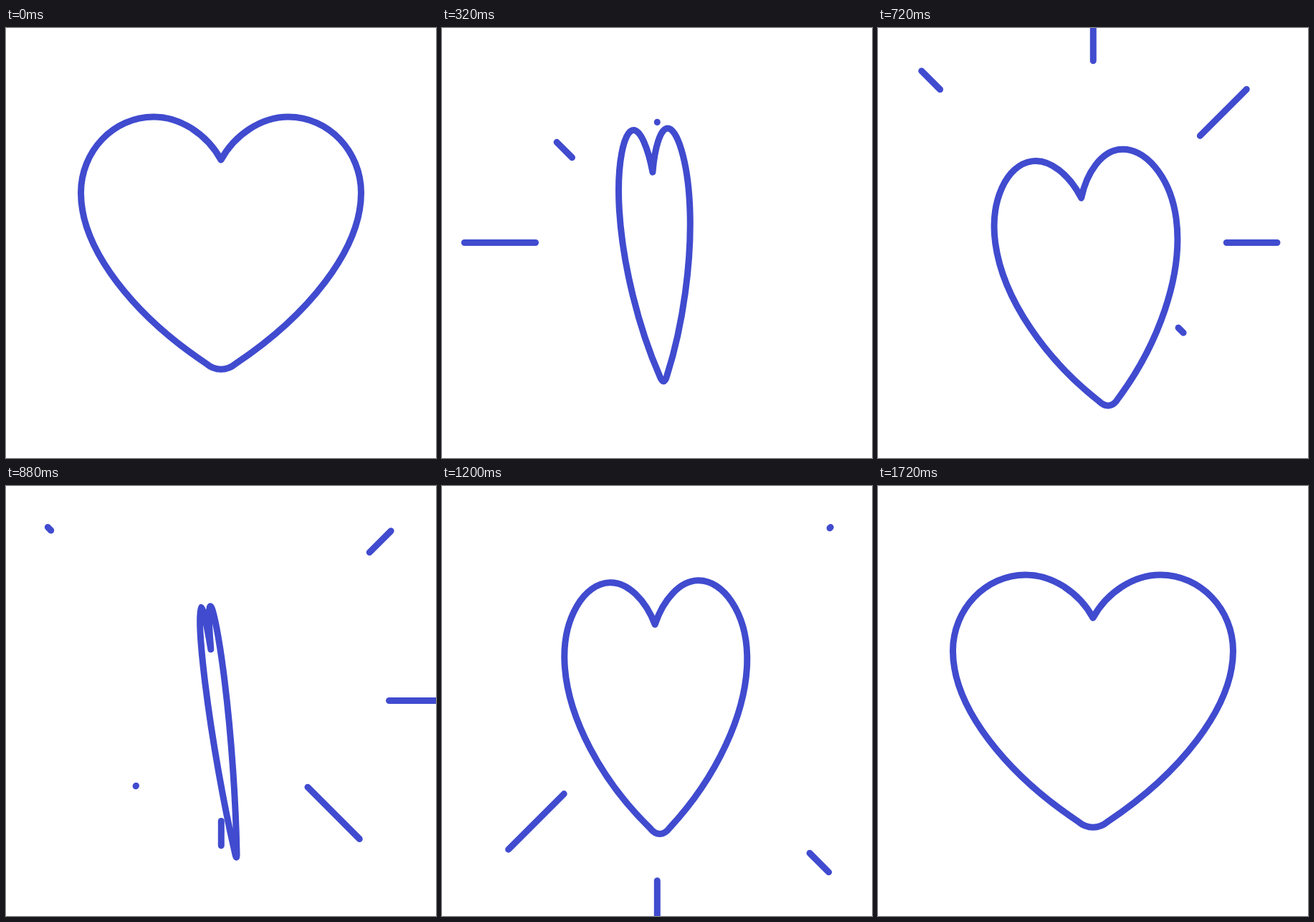
An HTML page that plays this animation: 600x600 px, repeating every 2.92 s.

```html
<!DOCTYPE html>
<html lang="en">
<head>
<meta charset="utf-8">
<title>Spinning heart</title>
<style>
  html, body { margin: 0; width: 100%; height: 100%; overflow: hidden; background: #fff; }
  svg { display: block; width: 100vw; height: 100vh; }
  path { fill: none; stroke: #404bcf; stroke-width: 9; stroke-linecap: round; stroke-linejoin: round; }
  #heart { vector-effect: non-scaling-stroke; }
</style>
</head>
<body>
<svg viewBox="0 0 600 600">
  <g id="rays"></g>
  <path id="heart" d="M300 184C281 149 244 124 206 124C150 124 104.5 172 104.5 230
    C104.5 310 180 402 279 468C292 479 308 479 321 468
    C420 402 495.5 310 495.5 230C495.5 172 450 124 394 124C356 124 319 149 300 184Z"/>
</svg>
<script>
const LOOP = 2920, TICK = 40;

// Smooth monotone curve through [time, value] keys
function curve(keys) {
  const n = keys.length;
  const slope = i => (keys[i + 1][1] - keys[i][1]) / (keys[i + 1][0] - keys[i][0]);
  const tan = keys.map((k, i) => {
    if (i === 0 || i === n - 1) return 0;
    const a = slope(i - 1), b = slope(i);
    return a * b > 0 ? 2 * a * b / (a + b) : 0;
  });
  return t => {
    if (t <= keys[0][0]) return keys[0][1];
    if (t >= keys[n - 1][0]) return keys[n - 1][1];
    let i = 0;
    while (t >= keys[i + 1][0]) i++;
    const h = keys[i + 1][0] - keys[i][0], u = (t - keys[i][0]) / h, v = 1 - u;
    return v * v * (1 + 2 * u) * keys[i][1] + u * u * (3 - 2 * u) * keys[i + 1][1]
      + h * u * v * (v * tan[i] - u * tan[i + 1]);
  };
}

const spin = curve([[80, 1], [320, -0.252], [560, -0.977], [600, -1], [880, 0.07],
  [1200, 0.652], [1400, 0.895], [1720, 1]]);
const drop = curve([[80, 0], [320, 17], [560, 46], [690, 52.5], [880, 43.2],
  [1200, 9.3], [1400, 2.3], [1720, 0]]);
const tilt = curve([[80, 0], [320, 3], [560, 6.6], [690, 7.7], [880, 7],
  [1200, 1.4], [1400, 0.35], [1720, 0]]);
const sway = curve([[320, 0], [560, -1.6], [880, 0]]);
const lead = curve([[560, 0], [880, 33], [1200, 0]]);

// Share of a ray's track covered at a given age
const START = -40, END = 560, LAG = 210;
const reach = curve([[START, 0], [0, 0.017], [44, 0.08], [88, 0.19], [127, 0.325],
  [165, 0.471], [209, 0.607], [253, 0.708], [330, 0.833], [435, 0.946], [490, 0.977], [END, 1]]);

// Clockwise from the left: inner and outer radius
const tracks = [[168, 342], [168, 342], [168, 342], [196, 342],
  [186, 360], [168, 342], [168, 342], [168, 342]];
const heart = document.getElementById('heart');
const rays = tracks.map(() => document.getElementById('rays')
  .appendChild(document.createElementNS('http://www.w3.org/2000/svg', 'path')));

function drawRay(ray, i, t) {
  const age = t - 121 - 117 * i;
  if (age <= START || age - LAG >= END) {
    ray.setAttribute('d', '');
    return;
  }
  const [from, to] = tracks[i];
  const angle = Math.PI * (1 + i / 4);
  const point = share => {
    const r = from + (to - from) * share;
    return (300.3 + r * Math.cos(angle)).toFixed(2) + ' ' + (299.5 + r * Math.sin(angle)).toFixed(2);
  };
  ray.setAttribute('d', 'M' + point(reach(age - LAG)) + 'L' + point(reach(age) + 0.001));
}

function draw(now) {
  const t = Math.floor(now % LOOP / TICK) * TICK;
  heart.setAttribute('transform',
    `translate(${300 + sway(t) * (t < 880)} ${300 + drop(t)}) rotate(${-tilt(t)}) ` +
    `scale(${spin(t)} 1) translate(-300 -300)`);
  rays.forEach((ray, i) => drawRay(ray, i, t + lead(t)));
}

let begin;
function frame(now) {
  begin ??= now;
  draw(now - begin);
  requestAnimationFrame(frame);
}
draw(0);
requestAnimationFrame(frame);
</script>
</body>
</html>
```
